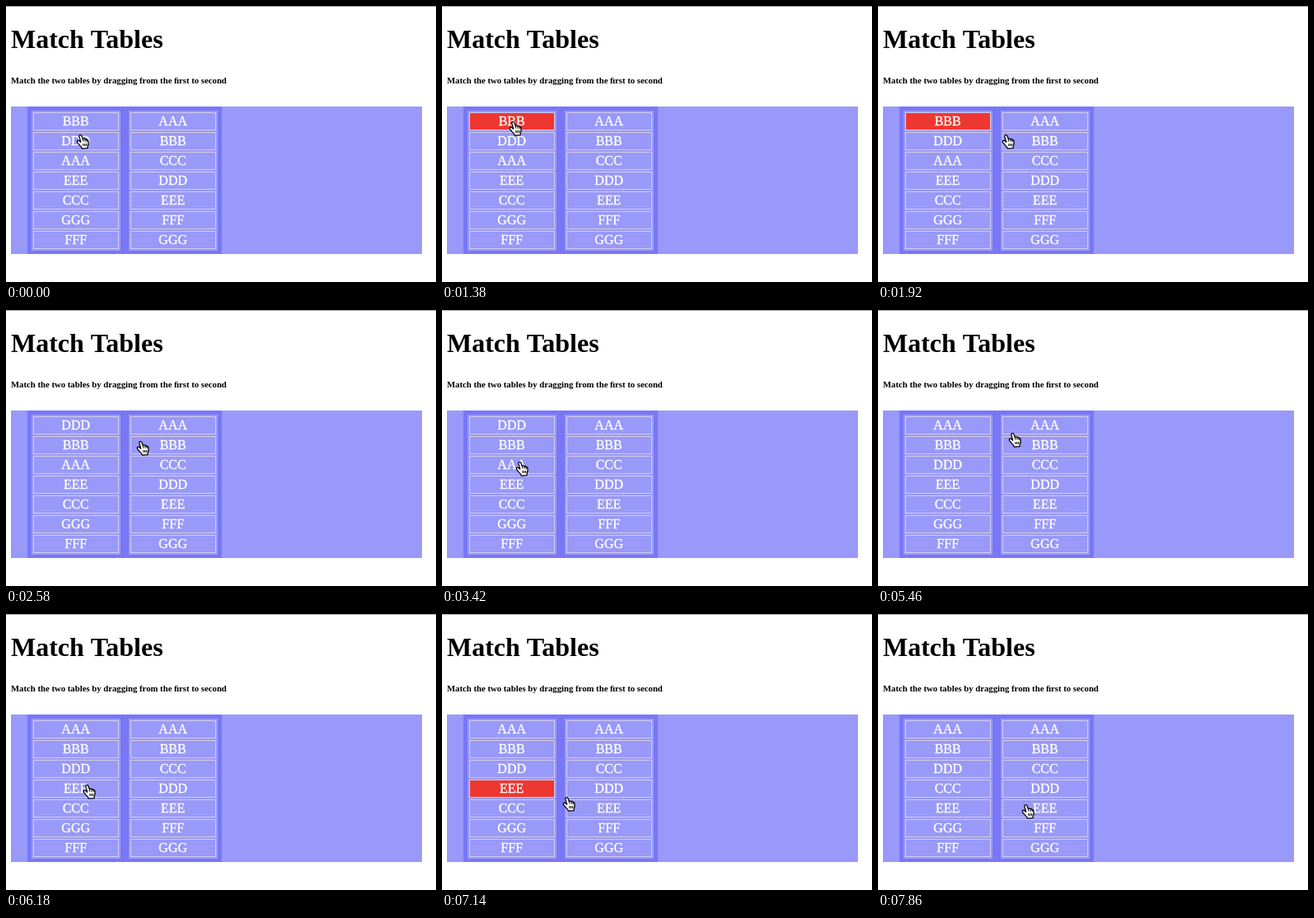
Animation of 522x335 px, one loop 8 s. Source, as an HTML page with a canvas:

```html
<!DOCTYPE html>
<html lang="en">
<head>
<meta charset="utf-8">
<title>Match Tables</title>
<style>
html, body { margin: 0; width: 100%; height: 100%; overflow: hidden; background: #fff; }
canvas { display: block; }
</style>
</head>
<body>
<canvas id="stage" width="522" height="335"></canvas>
<script>
const ctx = document.getElementById('stage').getContext('2d');
const LOOP = 8000, TICK = 60, ROW = 24;
const SERIF = '"Liberation Serif", "Times New Roman", serif';
const START = ['BBB', 'DDD', 'AAA', 'EEE', 'CCC', 'GGG', 'FFF'];
const ANSWERS = ['AAA', 'BBB', 'CCC', 'DDD', 'EEE', 'FFF', 'GGG'];

// Row `from` is picked at `pick` and trades places with row `to` at `drop`.
const drags = [
  { pick: 1380, drop: 2160, from: 0, to: 1 },
  { pick: 4200, drop: 4980, from: 2, to: 0 },
  { pick: 6840, drop: 7740, from: 3, to: 4 },
];

const easeOut = p => 1 - (1 - p) ** 2;
const easeInOut = p => p * p * (3 - 2 * p);

const home = [86, 156];
const moves = [
  { start: 0, end: 420, to: [82, 140], ease: easeInOut },
  { start: 1560, end: 2100, to: [160, 159], ease: easeOut },
  { start: 2520, end: 3420, to: [90, 184], ease: easeInOut },
  { start: 4320, end: 4800, to: [177, 134], ease: easeOut },
  { start: 5160, end: 6180, to: [94, 207], ease: easeInOut },
  { start: 6840, end: 7560, to: [175, 231], ease: easeOut },
];

function pointerAt(t) {
  let pos = home;
  for (const { start, end, to, ease } of moves) {
    if (t <= start) break;
    const k = ease(Math.min(1, (t - start) / (end - start)));
    pos = pos.map((v, i) => v + (to[i] - v) * k);
  }
  return pos.map(Math.floor);
}

function labelsAt(t) {
  const labels = [...START];
  for (const { drop, from, to } of drags) {
    if (t >= drop) [labels[from], labels[to]] = [labels[to], labels[from]];
  }
  return labels;
}

function rect(x, y, w, h, color) {
  ctx.fillStyle = color;
  ctx.fillRect(x, y, w, h);
}

function text(str, x, y, font, color, align = 'left') {
  ctx.font = `${font} ${SERIF}`;
  ctx.fillStyle = color;
  ctx.textAlign = align;
  ctx.fillText(str, x, y);
}

function cell(x, y, label, picked) {
  rect(x, y, 104, 22, '#d6cbe4');
  rect(x + 1, y + 1, 102, 20, picked ? '#ee3730' : '#9899f9');
  text(label, x + 51.7, y + 16, '16px', '#fff', 'center');
  // A hairline gives the white labels their slightly heavier weight.
  ctx.strokeStyle = '#fff';
  ctx.lineWidth = .35;
  ctx.strokeText(label, x + 51.7, y + 16);
}

function table(x, labels, picked) {
  rect(x, 127, 108, 170, '#9899f9');
  labels.forEach((label, i) => cell(x + 2, 129 + i * ROW, label, i === picked));
}

const hand = new Path2D(
  'M2.8 2.4 Q2.7 .7 4.2 .7 Q5.6 .7 6.1 2.2 L7.2 5.3 Q8.7 4.4 9.7 5.7 ' +
  'Q11.2 5 12 6.5 Q13.8 6.2 14 8.2 Q14.4 11.6 13.2 13.7 L13 16.6 ' +
  'L6.3 17.1 L5.6 15.4 L3.1 12.6 L.7 9.6 Q-.2 7.8 1.2 7.2 Q2.2 6.9 3.3 8 ' +
  'L4.7 9.2 Z');
const fingers = new Path2D('M7.2 5.3 L8 8.6 M9.7 5.7 L10.3 8.7 M12 6.5 L12.4 9 ' +
  'M7.7 11 L8 14 M9.6 11 L9.8 14 M11.5 11 L11.6 13.8');

function pointer([x, y]) {
  ctx.save();
  ctx.translate(x, y);
  ctx.lineJoin = 'round';
  ctx.lineWidth = 1.3;
  ctx.fillStyle = '#fff';
  ctx.strokeStyle = '#000';
  ctx.fill(hand);
  ctx.stroke(hand);
  ctx.lineWidth = 1;
  ctx.stroke(fingers);
  ctx.restore();
}

function draw(t) {
  rect(0, 0, 522, 335, '#fff');
  rect(0, 0, 522, 1, '#a9a9a9');
  text('Match Tables', 6, 51, 'bold 32px', '#000');
  text('Match the two tables by dragging from the \uFB01rst to second', 6, 94, 'bold 10.72px', '#000');
  rect(6, 122, 499, 179, '#9899f9');
  rect(26, 122, 236, 179, '#7877f7');
  const active = drags.find(d => t >= d.pick && t < d.drop);
  table(31, labelsAt(t), active ? active.from : -1);
  table(149, ANSWERS, -1);
  pointer(pointerAt(t));
}

const origin = performance.now();
function frame() {
  const t = (performance.now() - origin) % LOOP;
  draw(Math.floor(t / TICK) * TICK);
  requestAnimationFrame(frame);
}
frame();
</script>
</body>
</html>
```
